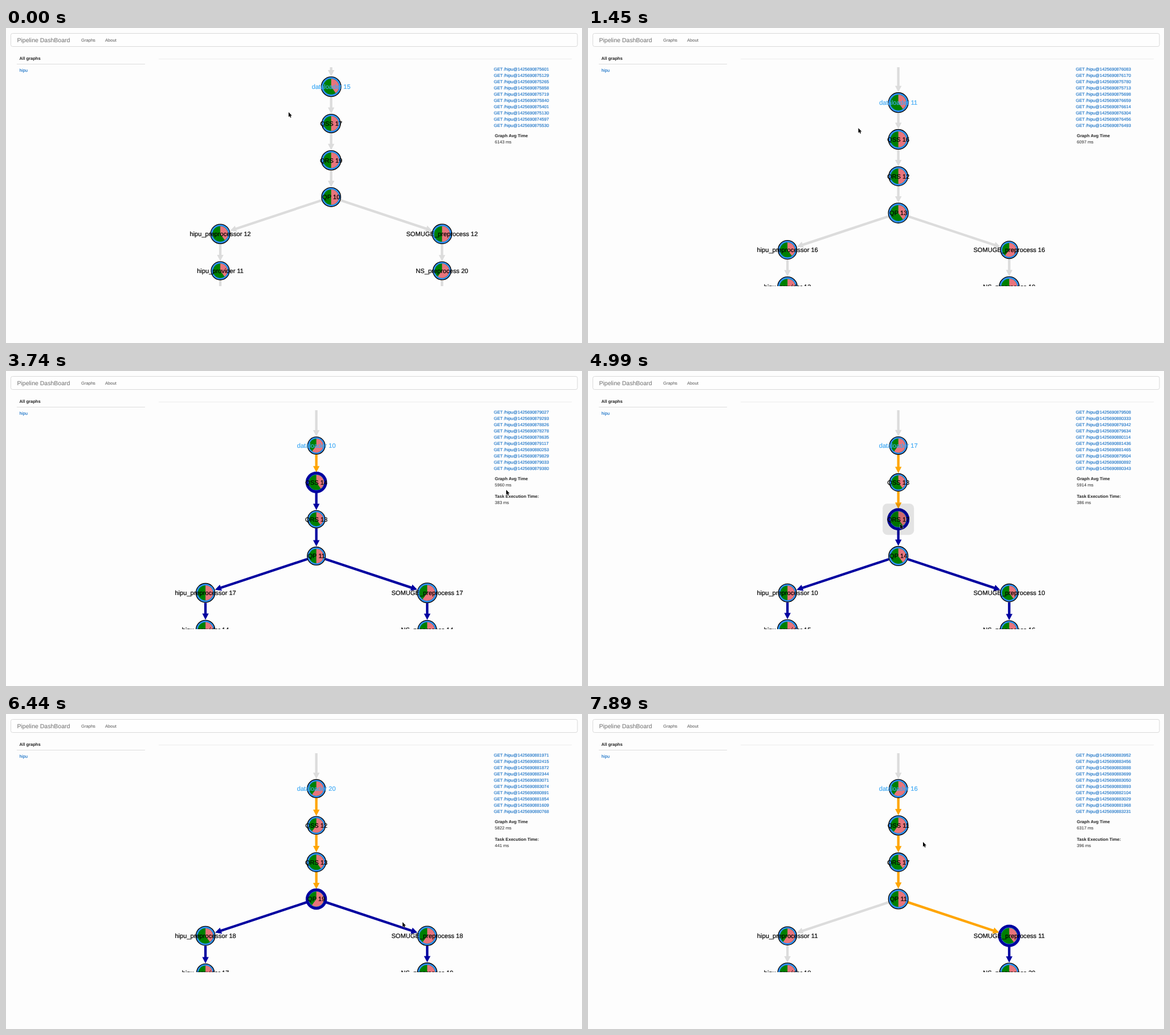
An HTML page for the animation above (8000 ms loop, 1011 by 554 pixels).

```html
<!DOCTYPE html>
<html lang="en">
<head>
<meta charset="utf-8">
<title>Pipeline DashBoard</title>
<style>
html, body { margin: 0; width: 100%; height: 100%; overflow: hidden; background: #fdfdfd; }
svg { display: block; width: 1011px; height: 554px; }
text { font-family: "Liberation Sans", Arial, sans-serif; font-size: 7.6px; fill: #222; text-rendering: geometricPrecision; white-space: pre; }
.brand { font-size: 10.5px; fill: #6c6c6c; }
.nav { fill: #555; }
.bold { font-weight: bold; }
.link { fill: #0f6cc4; stroke: #0f6cc4; stroke-width: .12px; }
.label { font-size: 11.1px; fill: #000; stroke: #000; stroke-width: .2px; text-anchor: middle; }
.root { fill: #3fa9f5; stroke: #3fa9f5; }
</style>
</head>
<body>
<svg viewBox="0 0 1011 554">
  <defs><clipPath id="pane"><rect x="268" y="69" width="580" height="385"/></clipPath></defs>
  <rect x="8.5" y="9.5" width="994.5" height="23" rx="3" fill="#fefefe" stroke="#d9d9d9"/>
  <text class="brand" x="19.5" y="24.5">Pipeline DashBoard</text>
  <text class="nav" x="132" y="23.7">Graphs</text>
  <text class="nav" x="174" y="23.7">About</text>
  <text class="bold" x="23.6" y="56">All graphs</text>
  <path d="M19 63.5H244" stroke="#ddd"/>
  <text class="link" x="23.6" y="76.5">hipu</text>
  <path d="M268 54.5H993" stroke="#ececec"/>
  <g id="graph" clip-path="url(#pane)"></g>
  <g id="side"></g>
  <path id="cursor" d="M0 0V8.4L1.9 6.7 3.2 9.7 4.6 9.1 3.3 6.2H5.9Z" fill="#000" stroke="#fff" stroke-width=".7" paint-order="stroke"/>
</svg>
<script>
const LOOP = 8000, TICK = 207.7, LAST = 38;
const ROW = 64.75, COLUMN = 194.6;
const GREY = '#dcdcdc', ORANGE = '#ffa500', NAVY = '#0000a0';
const $ = id => document.getElementById(id);

// name, parent index, column, row
const NODES = [
  ['dataloader', -1, 0, 0], ['QSS', 0, 0, 1], ['QRS', 1, 0, 2], ['QP', 2, 0, 3],
  ['hipu_preprocessor', 3, -1, 4], ['SOMUGE_preprocess', 3, 1, 4],
  ['hipu_provider', 4, -1, 5], ['NS_preprocess', 5, 1, 5],
];

// tick, selected node
const CLICKS = [[0, -1], [14, 1], [24, 2], [28, 3], [33, 5]];

// tick, x, y
const POINTER = [
  [0, 496, 148], [1, 493, 151], [2, 493, 151], [6, 467, 179], [8, 482, 173],
  [10, 602, 157], [12, 565, 188], [14, 549, 198], [18, 878, 209],
  [24, 548, 269], [28, 547, 328], [31, 696, 366], [33, 741, 393], [LAST, 588, 225],
];

function random(seed) {
  let s = seed * 7919 + 17;
  const next = () => (s = s * 16807 % 2147483647) / 2147483647;
  next(); next();
  return next;
}

// the server data refreshes about once a second
const refreshAt = tick => Math.max(0, Math.ceil((tick - 2.5) / 4.714));

function serverData(n) {
  const rnd = random(n + 1);
  const between = (a, b) => Math.floor(a + rnd() * (b - a + 1));
  const nodes = NODES.map(() => ({
    count: between(10, 20),
    r: 15.2 + 3 * Math.sqrt(rnd()),
    share: between(4, 6) / 10,
  }));
  nodes[5].count = nodes[4].count;
  const ids = Array.from({ length: 10 }, () =>
    1425690875100 + n * 1000 + Math.round((rnd() + rnd() - 1) * 1500));
  return { nodes, ids, average: between(5790, 6330) };
}

const latest = (rows, tick) => rows.filter(r => r[0] <= tick).pop();

function pointerAt(tick) {
  const i = Math.max(1, POINTER.findIndex(p => p[0] >= tick));
  const [a, ax, ay] = POINTER[i - 1], [b, bx, by] = POINTER[i];
  const f = (tick - a) / (b - a);
  return [ax + (bx - ax) * f, ay + (by - ay) * f];
}

const text = (x, y, cls, s) => `<text x="${x}" y="${y}" class="${cls}">${s}</text>`;

// true when a is b or one of its ancestors
function leadsTo(a, b) {
  for (; b >= 0; b = NODES[b][1]) if (a === b) return true;
  return false;
}

function edge(a, b, color) {
  const d = Math.hypot(b.x - a.x, b.y - a.y);
  const ux = (b.x - a.x) / d, uy = (b.y - a.y) / d;
  const at = (dist, side) => `${a.x + ux * dist - uy * side} ${a.y + uy * dist + ux * side}`;
  const tip = d - b.r - .3;
  return `<path d="M${at(a.r, 0)}L${at(tip - 9, 0)}" stroke="${color}" stroke-width="4.3"/>` +
    `<path d="M${at(tip, 0)}L${at(tip - 11, 5.7)}L${at(tip - 11, -5.7)}Z" fill="${color}"/>`;
}

function node(n, selected) {
  const R = n.r * .77, angle = n.share * 2 * Math.PI;
  const [r, color, width] = selected ? [n.r - 1, NAVY, 5] : [n.r - .6, '#000', 1.3];
  return `<g transform="translate(${n.x} ${n.y})">
    <circle r="${n.r - .6}" fill="#2e90f5"/><circle r="${R}" fill="#008000"/>
    <path fill="#e8747c" d="M0 0V${-R}A${R} ${R} 0 ${n.share > .5 ? 1 : 0} 1 ${R * Math.sin(angle)} ${-R * Math.cos(angle)}Z"/>
    <circle r="${r}" fill="none" stroke="${color}" stroke-width="${width}"/></g>`;
}

function drawGraph(tick, data, clickTick, sel) {
  // dragging the pane moves the graph with the pointer
  const [px, py] = pointerAt(Math.min(6, Math.max(2, tick)));
  const left = 570.7 + px - 493, top = 103.2 + py - 151;
  const nodes = NODES.map(([name, parent, col, row], i) => ({
    ...data.nodes[i], name, parent, x: left + col * COLUMN, y: top + row * ROW,
  }));
  const color = (from, to) => sel < 0 ? GREY
    : leadsTo(sel, from) ? NAVY
    : leadsTo(to, sel) ? ORANGE : GREY;

  let out = edge({ x: left, y: 0, r: 0 }, nodes[0], GREY);
  nodes.forEach((n, i) => {
    if (n.parent >= 0) out += edge(nodes[n.parent], n, color(n.parent, i));
    if (i > 5) out += edge(n, { x: n.x, y: n.y + ROW, r: 17 }, color(i, -1));
  });
  nodes.forEach((n, i) => out += node(n, i === sel));
  nodes.forEach((n, i) => out += text(n.x, n.y + 3.9, i ? 'label' : 'label root', `${n.name} ${n.count}`));
  if (sel >= 0 && tick === clickTick) {
    const { x, y } = nodes[sel];
    out += `<rect x="${x - 27.5}" y="${y - 27.5}" width="55" height="55" rx="8" opacity=".1"/>`;
  }
  $('graph').innerHTML = out;
}

function drawSide(n, data, sel) {
  let out = data.ids.map((id, i) => text(856.3, 74.7 + i * 11, 'link', `GET /hipu@${id}`)).join('');
  out += text(858, 192, 'bold', 'Graph Avg Time') + text(858, 203, '', `${data.average} ms`);
  if (sel >= 0) {
    const time = Math.floor(380 + random(n * 10 + sel)() * 135);
    out += text(858, 222.8, 'bold', 'Task Execution Time:') + text(858, 233.8, '', `${time} ms`);
  }
  $('side').innerHTML = out;
}

let shown = -1;
function frame(now) {
  const tick = Math.min(LAST, Math.floor((now % LOOP + 8) / TICK));
  if (tick !== shown) {
    shown = tick;
    const n = refreshAt(tick), data = serverData(n);
    const [clickTick, sel] = latest(CLICKS, tick);
    drawGraph(tick, data, clickTick, sel);
    drawSide(n, data, sel);
    $('cursor').setAttribute('transform', `translate(${pointerAt(tick).join(' ')})`);
  }
  requestAnimationFrame(frame);
}
frame(performance.now());
</script>
</body>
</html>
```
